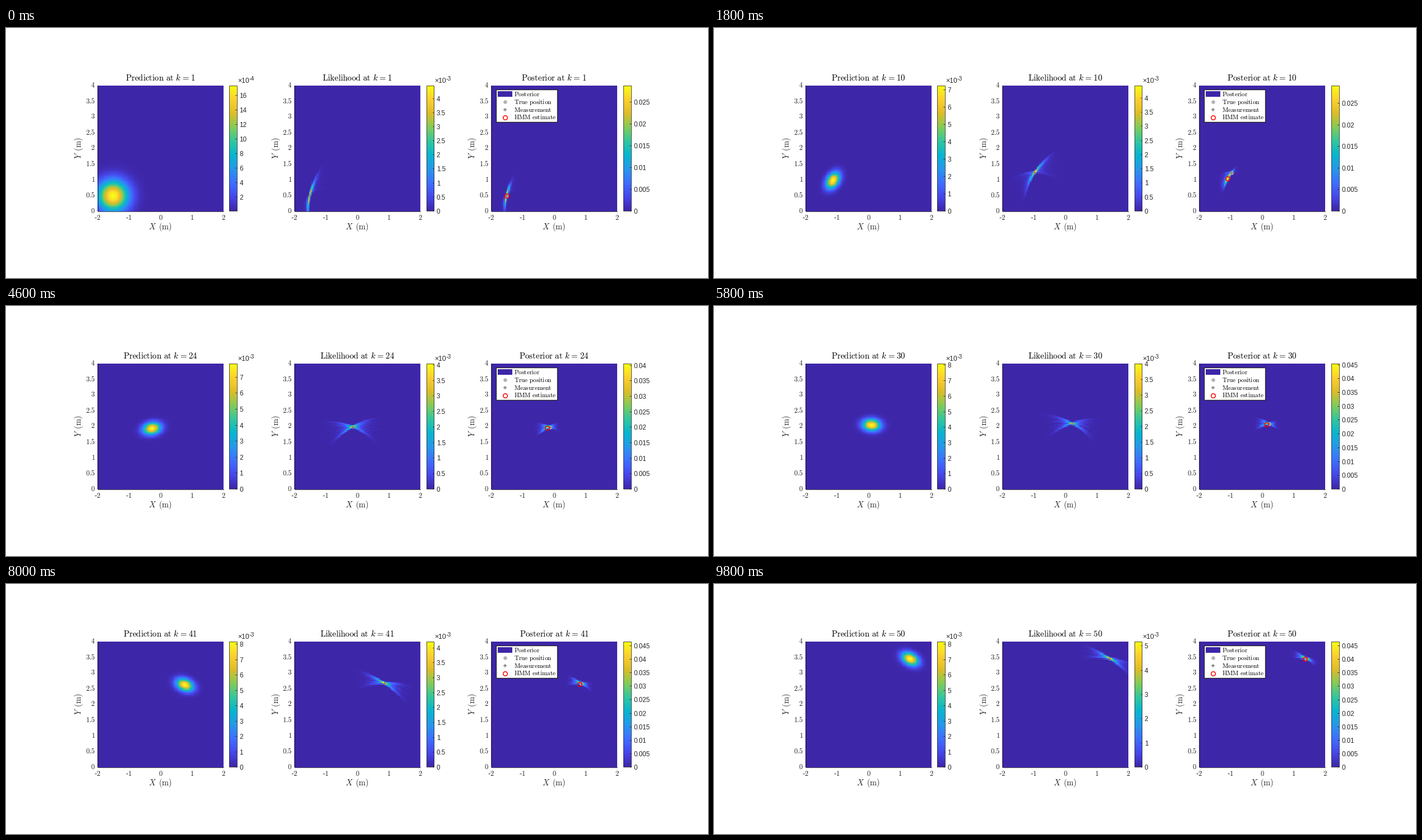
These frames come from a looping animation (1252x447 px, 10000 ms). A matplotlib script:

```python
import numpy as np
import matplotlib.pyplot as plt
from matplotlib.animation import FuncAnimation
from matplotlib.colors import LinearSegmentedColormap
from matplotlib.patches import Rectangle

W, H, DPI = 1252, 447, 100
STEPS, INTERVAL = 50, 200
TOP, BOTTOM, SIDE = 103, 328, 225
PANELS = [163 + 351 * i for i in range(3)]
BARS = [398 + 351.5 * i for i in range(3)]
NAMES = ("Prediction", "Likelihood", "Posterior")
INK = "#262626"
CMAP = LinearSegmentedColormap.from_list("heat", [
    "#3E26A8", "#4747EB", "#3E6FFF", "#2797EB", "#08B5D0",
    "#31C69F", "#81CC59", "#DCBD29", "#FCCF30", "#F9FB15"])

CELLS = 100
axis = (np.arange(CELLS) + .5) * 4 / CELLS
GX, GY = np.meshgrid(axis - 2, axis)
SENSORS = np.cos(np.pi * (np.arange(10) + .5) / 10)
path_y = np.polynomial.Polynomial.fit([1, 10, 16, 24, 30, 41, 50],
                                      [.5, 1.23, 1.7, 1.97, 2.08, 2.67, 3.45], 5)


def truth_x(k):
    return -1.5 + 2.9 * (k - 1) / 49


def truth(k):
    return truth_x(k), path_y(k)


def lagged(k, lead=0):
    """Where the filter believes the target is; the lag shrinks over time."""
    lag = max(0, min(k - 1, 3 - .035 * k) - lead)
    return truth_x(k - lag), path_y(k - lag * (1 - (k / STEPS) ** 2))


def prediction(k):
    x, y = lagged(k)
    spread = np.exp(-(k - 1) / .8)
    a = np.arctan2(-1.4 * x, y)
    dx, dy = GX - x, GY - y
    u = (dx * np.cos(a) + dy * np.sin(a)) / (.195 + .145 * spread)
    v = (dy * np.cos(a) - dx * np.sin(a)) / (.13 + .21 * spread)
    return np.exp(-(u * u + v * v) / 2)


def likelihood(k):
    """Range arcs around each sensor, fading away from the position."""
    x, y = truth(k)
    y += .02
    rng = np.random.default_rng(k)
    arcs = 0
    for s in SENSORS:
        radius = np.hypot(x - s, y)
        offset = np.hypot(GX - s, GY) - radius - rng.normal(0, .008)
        arcs = arcs + radius ** 2 * np.exp(-(offset / .02) ** 2 / 2)
    return arcs * np.exp(-((GX - x) ** 2 + (GY - y) ** 2) / (2 * .38 ** 2))


def peaks(k):
    """Top value of each colour bar."""
    rise = 1 / (1 + np.exp((22 - k) / 3))
    pred = 17.3 if k == 1 else 7.2 + .95 * rise
    lik = np.interp(k, [1, 10, 27, 41, 50], [4.45, 4.43, 3.95, 4.2, 5.17])
    return pred, lik, .0287 + .0178 * rise


def to_px(left, x, y):
    return left + (x + 2) * SIDE / 4, BOTTOM - y * SIDE / 4


def pt(px):
    return px * 72 / DPI


def rm(s):
    return r"$\mathrm{%s}$" % s.replace(" ", r"\ ")


plt.rcParams["mathtext.fontset"] = "cm"
fig = plt.figure(figsize=(W / DPI, H / DPI), dpi=DPI, facecolor="white")
ax = fig.add_axes([0, 0, 1, 1])
ax.axis("off")


def label(x, y, s, size, ha="center", va="center", color=INK,
          family="Liberation Serif", **kw):
    return ax.text(x, y, s, fontsize=pt(size), ha=ha, va=va, color=color,
                   family=family, **kw)


def sans(x, y, s, size=11.6, va="center_baseline"):
    return label(x, y, s, size, "left", va, family="Liberation Sans")


def line(xs, ys, **kw):
    return ax.plot(xs, ys, color=INK, lw=pt(.8), **kw)[0]


def marker(kind, x=-50, y=-50, z=5):
    style = {
        "true": dict(marker="o", ms=pt(6), mfc="#b3b3b3", mec="#b3b3b3", mew=pt(.5)),
        "meas": dict(marker="+", ms=pt(6.5), mec="#808080", mew=pt(1.6)),
        "est": dict(marker="o", ms=pt(7.6), mfc="none", mec="red", mew=pt(1.5)),
    }[kind]
    return ax.plot([x], [y], ls="none", zorder=z, **style)[0]


def build_panel(left, bar):
    image = ax.imshow(np.zeros((CELLS, CELLS)), cmap=CMAP, vmin=0, vmax=1,
                      extent=(left, left + SIDE, BOTTOM, TOP), origin="lower",
                      interpolation="nearest", aspect="auto")
    edge, floor = left + .5, BOTTOM - .5
    line([edge, edge, left + SIDE], [TOP, floor, floor])
    for i in range(9):
        label(left - 4, BOTTOM - .5 - i * SIDE / 8, rm("%g" % (i / 2)), 12.6, "right")
    for v in range(-2, 3):
        s = ("-" if v < 0 else "") + rm(str(abs(v)))
        label(left + (v + 2) * SIDE / 4, 343, s, 12.6, va="baseline")
    unit = r"\ \hspace{0.15}\mathrm{(m)}$"
    label(left + SIDE / 2, 360, "$X" + unit, 14.5, va="baseline")
    label(left - 32.5, 215, "$Y" + unit, 14.5, rotation=90)
    ax.imshow(np.linspace(0, 1, 256)[:, None], cmap=CMAP, origin="lower",
              extent=(bar, bar + 13.5, BOTTOM - 1, TOP), aspect="auto")
    ax.add_patch(Rectangle((bar, TOP), 13.5, SIDE - 1, fill=False,
                           ec=INK, lw=pt(.8), zorder=3))
    title = label(left + SIDE / 2, 94, "", 15, va="baseline", color="black")
    return image, title


def build_legend():
    ax.add_patch(Rectangle((873.5, 109.5), 109.5, 58.5, fc="white", ec=INK,
                           lw=pt(1.3), zorder=7))
    ax.add_patch(Rectangle((876.5, 113), 26.5, 10.4, fc=CMAP(0), ec="none", zorder=8))
    rows = ("Posterior", "True position", "Measurement", "HMM estimate")
    for i, s in enumerate(rows):
        label(906, 121.7 + 13.9 * i, rm(s), 11.3, "left", "baseline", "black", zorder=8)
    for i, kind in enumerate(("true", "meas", "est")):
        marker(kind, 889.5, 132.2 + 13.9 * i, 8)


panels = [build_panel(*pair) for pair in zip(PANELS, BARS)]
build_legend()
lik_meas = marker("meas")
post_true, post_meas, post_est = (marker(m) for m in ("true", "meas", "est"))
ax.set_xlim(0, W)
ax.set_ylim(H, 0)
bar_labels = []


def draw_bar(bar, low, high, step, power=None):
    for i in range(int(np.ceil(low / step)), int(high / step + 1e-6) + 1):
        y = BOTTOM - 1 - (i * step - low) / (high - low) * (SIDE - 1)
        bar_labels.append(line([bar + 11.2, bar + 13.5], [y, y], zorder=4))
        bar_labels.append(sans(bar + 18.3, y + .5, "%g" % (i * step)))
    if power:
        bar_labels.append(sans(bar + 15, 98, "×10", 12.2, "baseline"))
        bar_labels.append(sans(bar + 35.5, 93.5, str(power), 10.4, "baseline"))


def tick_step(high):
    return .5 if high < 5 else 1 if high < 10 else 2


def update(frame):
    k = frame + 1
    pred, lik = prediction(k), likelihood(k)
    for (image, title), name, field in zip(panels, NAMES, (pred, lik, pred * lik)):
        image.set_data(field / field.max())
        title.set_text(r"$\mathrm{%s\ at\ }k\hspace{0.07}=\hspace{0.07}%d$" % (name, k))

    while bar_labels:
        bar_labels.pop().remove()
    pred_top, lik_top, post_top = peaks(k)
    first = k == 1
    draw_bar(BARS[0], .08 * first, pred_top, tick_step(pred_top), -3 - first)
    draw_bar(BARS[1], 0, lik_top, tick_step(lik_top), -3)
    draw_bar(BARS[2], 0, post_top, .005)

    spots = ((lik_meas, 1, truth(k)), (post_true, 2, truth(k)),
             (post_meas, 2, truth(k)), (post_est, 2, lagged(k, lead=.6)))
    for spot, panel, place in spots:
        px, py = to_px(PANELS[panel], *place)
        spot.set_data([px], [py])
    return []


anim = FuncAnimation(fig, update, frames=STEPS, interval=INTERVAL,
                     init_func=lambda: [], repeat=True, blit=False)
plt.show()
```
